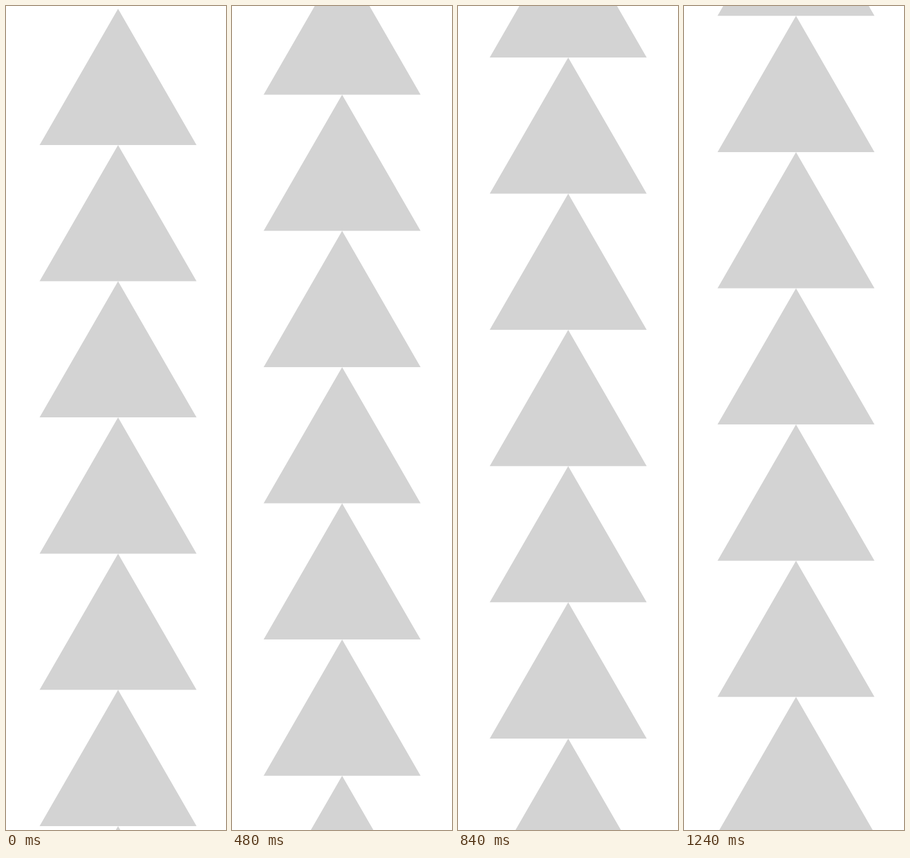
These frames come from a looping animation (342x1280 px, 1.28 s). An HTML page:

```html
<!DOCTYPE html>
<html lang="en">
<head>
<meta charset="utf-8">
<title>Rising triangles</title>
<style>
html, body { margin: 0; width: 100%; height: 100%; overflow: hidden; background: #fff; }
svg { display: block; width: 342px; height: 1280px; }
</style>
</head>
<body>
<svg viewBox="0 0 342 1280">
  <path id="column" fill="#d3d3d3"/>
</svg>
<script>
const LOOP = 1280, FRAME = 40;
const PITCH = 211.6, HALF = 122, COUNT = 7;
const TICKS_PER_MS = 0.048, TICKS = 62, RISE = 3.4;
const CENTRE = 172.4, SWAY = 1.8, BASE = 215.9;

const column = document.getElementById("column");
column.setAttribute("d", Array.from({ length: COUNT }, (_, i) =>
  `M0 ${(i - 1) * PITCH}L${HALF} ${i * PITCH}H${-HALF}Z`).join(""));

// The column climbs in whole ticks while swaying once per loop.
function draw(ms) {
  const t = Math.floor((ms % LOOP) / FRAME) * FRAME;
  const tick = Math.floor(t * TICKS_PER_MS);
  const x = CENTRE + SWAY * Math.cos(2 * Math.PI * tick / TICKS);
  const y = BASE - RISE * tick;
  column.setAttribute("transform", `translate(${x} ${y})`);
}

let start;
function loop(now) {
  start ??= now;
  draw(now - start);
  requestAnimationFrame(loop);
}
draw(0);
requestAnimationFrame(loop);
</script>
</body>
</html>
```
